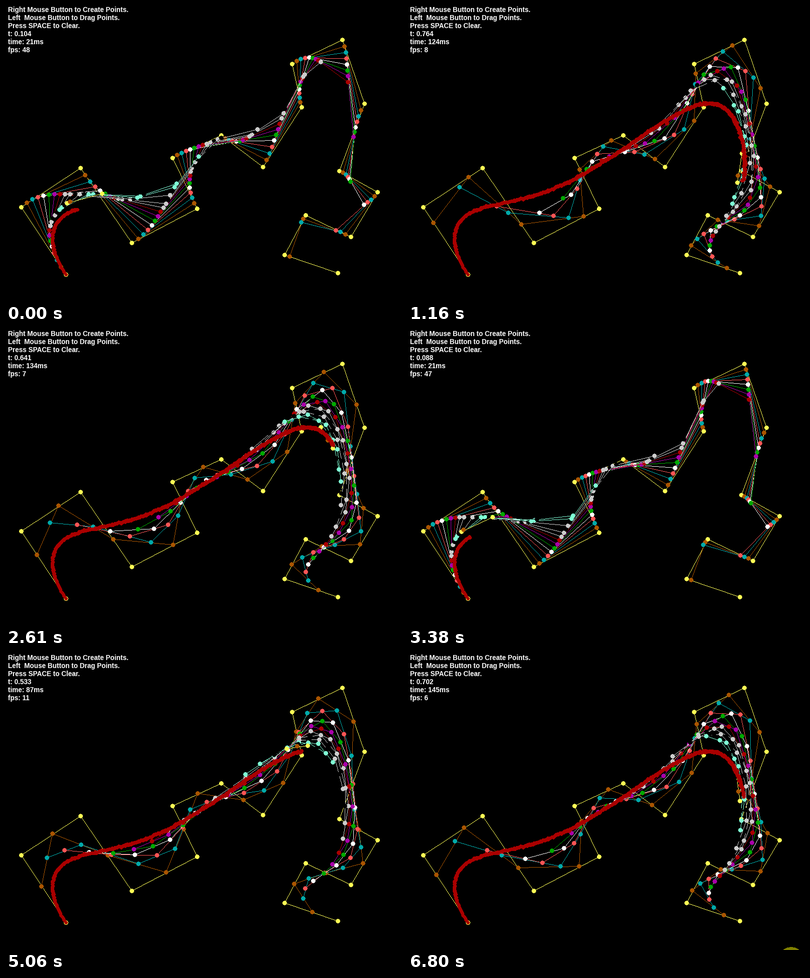
A matplotlib script that plays this animation: 788 px wide and 589 px high, repeating every 6870 ms.

```python
from math import acos, comb, cos, pi

import numpy as np
import matplotlib.pyplot as plt
from matplotlib.animation import FuncAnimation
from matplotlib.colors import to_rgb

W, H = 788, 589
LOOP, TICK = 6870, 30

CONTROL = np.array([
    (119, 534), (30, 400), (148, 322), (250, 471), (380, 403), (331, 302),
    (428, 257), (511, 320), (588, 201), (569, 115), (669, 67), (713, 194),
    (663, 328), (739, 370), (686, 459), (596, 416), (554, 495), (660, 531)])
DEGREE = len(CONTROL) - 1

YELLOW, BROWN, TEAL, PINK = "#ffff55", "#aa5500", "#00aaaa", "#ff5555"
GREEN, PURPLE, RED = "#00aa00", "#aa00aa", "#aa0000"
GRAY, AQUA = "#cccccc", "#7fffd4"
PALETTE = [YELLOW, BROWN, TEAL, PINK, "white", GREEN, PURPLE, RED,
           GRAY, GRAY, "black", GRAY, "black", AQUA, AQUA, "black"]

# t swings between 0 and 1: (ms, t, half swings completed)
KEYS = [(0, .104, 0), (1160, .764, 0), (1890, 1, 1), (2610, .641, 1),
        (3380, .088, 1), (4370, .144, 2), (5850, .970, 2), (6800, .702, 3)]
KEY_MS = [k[0] for k in KEYS]
SPEED = 1.5  # radians per second
SLOT = 70    # ms between possible screen refreshes


def swing(phase):
    return (1 - cos(phase)) / 2


def phase_of(t, half):
    a = acos(1 - 2 * t)
    return half * pi + (pi - a if half % 2 else a)


KEY_PHASE = [phase_of(t, half) for _, t, half in KEYS]


def phase_at(ms):
    return np.interp(ms, KEY_MS, KEY_PHASE)


def cost(t):
    """Milliseconds needed to draw the scene at t."""
    return 2.8 + 190 * t - 12.5 * t * t


def refresh_times():
    """Moments of new pictures: rarer while the curve is long."""
    times = []
    for start, end in zip(KEY_MS, KEY_MS[1:] + [LOOP]):
        ms = start
        while ms == start or ms < end - .7 * SLOT:
            times.append(ms)
            ms += SLOT * max(1, round(cost(swing(phase_at(ms))) / SLOT))
    return times


REFRESH = refresh_times()


def casteljau(t):
    """All levels of the construction, in whole pixels."""
    pts = CONTROL
    yield pts
    while len(pts) > 1:
        pts = np.floor(pts[:-1] * (1 - t)) + np.floor(pts[1:] * t)
        yield pts


def bernstein_curve(n=1000):
    """Curve points with every term cut to whole pixels."""
    s = np.linspace(0, 1, n + 1)[:, None]
    return sum(np.floor(comb(DEGREE, k) * s**k * (1 - s)**(DEGREE - k) * p)
               for k, p in enumerate(CONTROL))


def disc(r):
    """Pixel offsets of a filled circle."""
    y, x = np.mgrid[-r:r + 1, -r:r + 1]
    return np.argwhere(x * x + y * y <= r * (r + .5)) - r


CURVE = bernstein_curve()
DOT, PEN, POINTER = disc(4), disc(3), disc(26)
canvas = np.zeros((H, W, 3), np.uint8)


def plot(pixels, color):
    x, y = np.floor(pixels + .5).astype(int).reshape(-1, 2).T
    ok = (x >= 0) & (x < W) & (y >= 0) & (y < H)
    canvas[y[ok], x[ok]] = np.round(255 * np.array(to_rgb(color)))


def stamp(shape, pts, color):
    plot(np.asarray(pts)[:, None] + shape, color)


def polyline(pts, color):
    for a, b in zip(pts, pts[1:]):
        plot(np.linspace(a, b, int(abs(b - a).max()) + 1), color)


fig = plt.figure(figsize=(W / 72, H / 72), dpi=72, facecolor="black")
screen = fig.figimage(canvas, origin="upper")

HELP = ["Right Mouse Button to Create Points.",
        "Left  Mouse Button to Drag Points.",
        "Press SPACE to Clear."]
labels = [fig.text(4 / W, 1 - (12 + 16 * i) / H, s, color="white",
                   family="Liberation Sans", weight="bold", size=13.5,
                   va="baseline")
          for i, s in enumerate(HELP + [""] * 3)]


def draw(i):
    now = i * TICK + 20
    ms = REFRESH[np.searchsorted(REFRESH, now, side="right") - 1]
    phase = phase_at(ms)
    t = swing(phase)
    took = cost(swing(phase - SPEED * cost(t) / 1000))

    canvas[:] = 0
    for level, pts in enumerate(casteljau(t)):
        color = PALETTE[level % len(PALETTE)]
        polyline(pts, color)
        stamp(DOT, pts, color)
    stamp(PEN, CURVE[:round(t * 1000) + 1], RED)
    if ms >= KEY_MS[-1]:
        stamp(POINTER, [(762, 609)], "#808000")
    screen.set_data(canvas)

    labels[3].set_text(f"t: {t:.3f}")
    labels[4].set_text(f"time: {took:.0f}ms")
    labels[5].set_text(f"fps: {int(1000 / took)}")
    return []


anim = FuncAnimation(fig, draw, frames=LOOP // TICK, interval=TICK,
                     init_func=lambda: [], repeat=True, repeat_delay=0)
plt.show()
```
